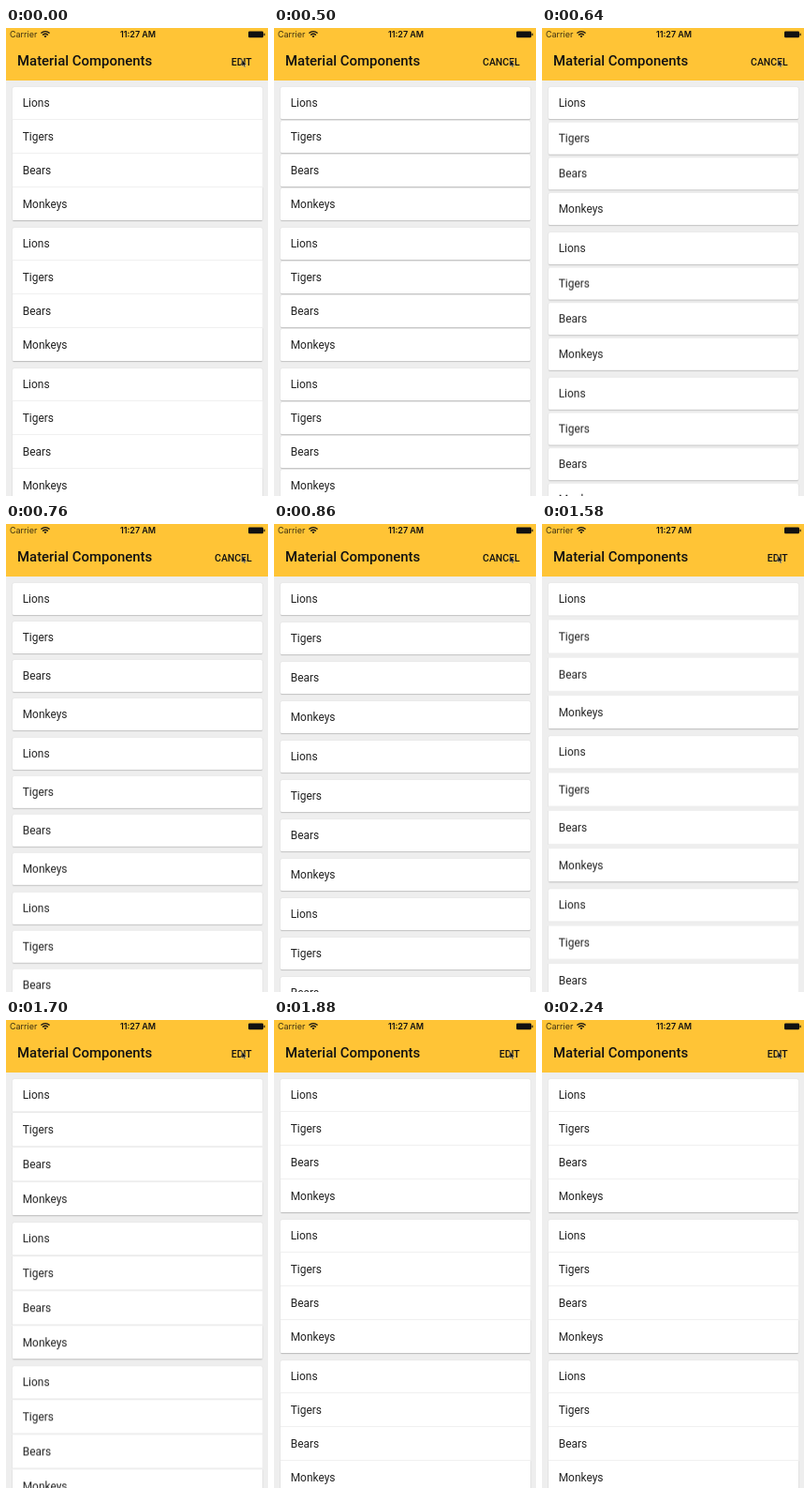
These frames come from a looping animation (280x499 px, 2260 ms). An HTML page:

```html
<!DOCTYPE html>
<html lang="en">
<head>
<meta charset="utf-8">
<title>Editable list</title>
<style>
  html, body { margin: 0; width: 100%; height: 100%; overflow: hidden; background: #eee; }
  #stage {
    position: relative; width: 280px; height: 499px; overflow: hidden;
    background: #eee; color: #212121; font-family: Roboto, sans-serif;
  }
  #stage * { box-sizing: border-box; }
  header { position: absolute; inset: 0 0 auto; height: 56px; background: #ffc436; color: #111; }
  header span { position: absolute; white-space: nowrap; }
  .status { top: 0; line-height: 14px; font-family: Inter, sans-serif; font-size: 8.96px; }
  .carrier { left: 4px; color: #3a3010; }
  .clock { left: 0; width: 282px; text-align: center; font-weight: 600; }
  .title { left: 12px; top: 25px; line-height: 21px; font-size: 14.93px; font-weight: 500; }
  .action { right: 17.4px; top: 29px; line-height: 15px; font-size: 10.45px; font-weight: 500; }
  header svg { position: absolute; left: 0; top: 0; }

  .row { position: absolute; left: 7px; top: 62px; width: 266.5px; height: 36px; }
  .row i { position: absolute; inset: 0; background: #fff; }
  .row b {
    position: absolute; left: 10.7px; top: 0; line-height: 36px;
    font-size: 11.95px; font-weight: 400;
  }
  .row .flat { box-shadow: -.5px 0 #ddd, .5px 0 #ddd; border-bottom: 1px solid #f0f0f0; }
  .row .flat.first { top: 1px; border-radius: 1.5px 1.5px 0 0; box-shadow: 0 0 1px #ccc; }
  .row .flat.last {
    bottom: 1px; border: 0; border-radius: 0 0 1.5px 1.5px;
    box-shadow: -.5px 0 #ddd, .5px 0 #ddd, 0 1px 1px #bbb;
  }
  .row .card { inset: 1px 0; border-radius: 1.5px; box-shadow: 0 0 1px #ccc, 0 1px 1px #c2c2c2; }
</style>
</head>
<body>
<div id="stage">
  <header>
    <span class="status carrier">Carrier</span>
    <span class="status clock">11:27 AM</span>
    <span class="title">Material Components</span>
    <span class="action flat">EDIT</span>
    <span class="action card">CANCEL</span>
    <svg width="280" height="56">
      <g fill="none" stroke="#111" stroke-width="1.3">
        <path d="M37.4 5.6Q42 1.6 46.6 5.6M39.1 7.5Q42 5 44.9 7.5"/>
      </g>
      <path d="M40.5 8.7Q42 7.5 43.5 8.7L42 10.3Z" fill="#111"/>
      <rect x="259" y="3.4" width="16" height="6.8" rx="1.2" fill="#111"/>
      <rect x="275.5" y="5.4" width="1.2" height="2.8" rx=".5" fill="#111"/>
      <path d="M252 33.4V41l1.7-1.5 1.1 2.5 1.2-.5-1.1-2.4h2.2Z"
        fill="#111" stroke="#e9dcae" stroke-width=".5"/>
    </svg>
  </header>
</div>
<script>
  const LOOP = 2260;
  const stage = document.getElementById('stage');
  const names = ['Lions', 'Tigers', 'Bears', 'Monkeys'];

  const at = (ms, props, easing = 'linear') => ({ offset: ms / LOOP, easing, ...props });
  const play = (el, frames) => el.animate(frames, { duration: LOOP, iterations: Infinity })
    .startTime = 0;

  // Rows spread apart on edit and close up again on cancel.
  function slide(el, closed, open) {
    const y = v => ({ transform: `translateY(${v}px)` });
    play(el, [
      at(0, y(closed)),
      at(517, y(closed), 'ease-in-out'),
      at(860, y(open)),
      at(1457, y(open), 'ease-in-out'),
      at(1800, y(closed)),
      at(LOOP, y(closed))
    ]);
  }

  // Hard switch between the plain look and the editing look.
  function toggle(el, editing) {
    const on = { opacity: editing ? 1 : 0 }, off = { opacity: editing ? 0 : 1 };
    play(el, [
      at(0, off, 'step-end'),
      at(500, on, 'step-end'),
      at(1440, off, 'step-end'),
      at(LOOP, off)
    ]);
  }

  for (let n = 0; n < 12; n++) {
    const k = n % 4, group = Math.floor(n / 4);
    const edge = k === 0 ? 'first' : k === 3 ? 'last' : '';
    const row = document.createElement('div');
    row.className = 'row';
    row.innerHTML = `<i class="flat ${edge}"></i><i class="card"></i><b>${names[k]}</b>`;
    stage.append(row);
    slide(row, group * 150 + k * 36, n * 42);
  }
  document.querySelectorAll('.flat').forEach(el => toggle(el, false));
  document.querySelectorAll('.card').forEach(el => toggle(el, true));
</script>
</body>
</html>
```
